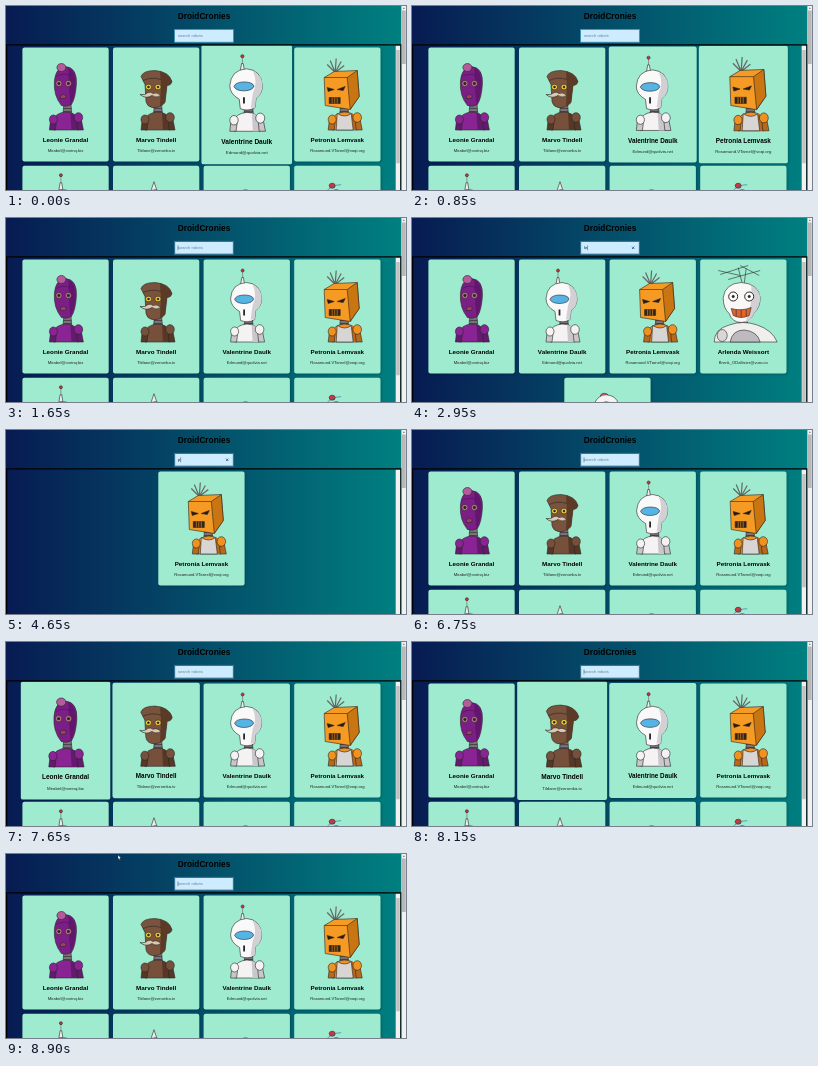
An HTML page that plays this animation: 400x184 px, repeating every 8.95 s.

```html
<!DOCTYPE html>
<html lang="en">
<head>
<meta charset="utf-8">
<title>Robot directory</title>
<style>
  html, body { margin: 0; width: 100%; height: 100%; overflow: hidden; }
  svg { display: block; width: 100vw; height: 100vh; font-family: "Liberation Sans", Arial, sans-serif; }
  .card { filter: drop-shadow(1px 1px 1px rgba(0, 0, 0, .2)); }
  .art { stroke: #2a2528; stroke-width: .6; stroke-linejoin: round; }
  .name { font-size: 6.25px; font-weight: bold; text-anchor: middle; }
  .mail { font-size: 4.17px; text-anchor: middle; fill: #222; }
</style>
</head>
<body>
<svg viewBox="0 0 400 184">
  <defs>
    <linearGradient id="sky"><stop stop-color="#071b52"/><stop offset="1" stop-color="#008080"/></linearGradient>
    <clipPath id="view"><rect x="1.3" y="39.6" width="388.4" height="145"/></clipPath>
  </defs>
  <rect width="395.6" height="184" fill="url(#sky)"/>
  <text x="198" y="13.4" font-size="8.3" font-weight="bold" text-anchor="middle">DroidCronies</text>

  <rect id="field" x="168.6" y="23.4" width="58.8" height="12.8" fill="#cdecff"/>
  <text id="query" x="172" y="31.2" font-size="4.1"></text>
  <path id="caret" stroke="#111" stroke-width=".4"/>
  <path id="clear" d="M220 28.6l2.4 2.4m0-2.4l-2.4 2.4" stroke="#123a6b" stroke-width=".7"/>

  <g id="cards" clip-path="url(#view)"></g>

  <rect x="389.7" y="39.6" width="4.6" height="145" fill="#f1f1f1"/>
  <rect id="thumb" x="390.2" y="44" width="3.5" fill="#c1c1c1"/>
  <path d="M.65 190V38.95H394.95V190" fill="none" stroke="#000" stroke-width="1.3"/>
  <rect x="395.6" width="4.4" height="184" fill="#f1f1f1"/>
  <rect x="396" y="4.5" width="3.7" height="53.5" fill="#b8b8b8"/>
  <path d="M396.8 2.8h2l-1-1.2z" fill="#555"/>
  <path id="pointer" d="M0 0v4.3l1-.9.7 1.5.7-.3-.7-1.5h1.3z" fill="#fff" stroke="#111" stroke-width=".3"/>
</svg>
<script>
const LOOP = 8950, PITCH_X = 90.6, PITCH_Y = 118.2, W = 86.3, H = 114;
const $ = id => document.getElementById(id);

// Drawing helpers, in card coordinates
const path = (d, fill = 'none', extra = '') => `<path d="${d}" fill="${fill}" ${extra}/>`;
const oval = (x, y, rx, ry, fill, extra = '') =>
  `<ellipse cx="${x}" cy="${y}" rx="${rx}" ry="${ry}" fill="${fill}" ${extra}/>`;
const neck = x => path(`M${x - 3.5} 56h7l1 11h-9z`, '#77757a') + path(`M${x - 4} 61h8m-8 3h8`);
const torso = (fill, shade, x) =>
  path(`M${x - 12} 82.5v-10q2-7 12-8q10 0 13 8v10z`, fill) + path(`M${x + 5} 65q6 2 8 7v10.5h-7z`, shade, 'stroke="none"') +
  path(`M${x - 15} 74l-1 8.5h6l1-8z`, shade) + oval(x - 12, 72, 4, 4.5, fill) +
  path(`M${x + 11} 72l1 10.5h6l-2-10z`, shade) + oval(x + 13, 70, 4.3, 4.8, fill);
const mast = (x, top, base, tip) => path(`M${x} ${top}V${base}`, 'none', 'stroke="#666"') +
  path(`M${x - 2} ${base}l1.2-7h1.6l1.2 7z`, '#eee') + oval(x, top, 1.5, 1.5, tip);
const dome = (fill, shade) => neck(44) + torso(fill, shade, 44) + oval(42, 42, 14, 18, fill);

const art = [
  neck(45) + torso('#8a2494', '#651a70', 43) +
    path('M32 34q1-14 11-15q12 1 11 18q-1 14-5 20q-5 3-10 1q-8-10-7-24z', '#7b1f87') +
    path('M46 20q8 4 7 19q-1 12-5 18q-2-20-2-37z', '#63166d', 'stroke="none"') +
    oval(39, 20, 4.5, 4, '#b65a9c') + path('M34 29q6-4 14-1', 'none', 'stroke="#4c1257"') +
    oval(36.5, 36, 3, 3, '#c77f8f') + oval(46, 36, 3, 3, '#c77f8f') +
    oval(36.5, 36, 1.3, 1.3, '#222') + oval(46, 36, 1.3, 1.3, '#222') + path('M38 48q3-2 6 0l-1 3h-5z', '#a83a6a'),
  neck(45) + torso('#76503a', '#573725', 44) +
    path('M28 29q2-6 14-6q14 1 17 11q-1 4-5 4l-2 17q-5 6-13 5q-5-1-6-6l-1-17z', '#7a533c') +
    path('M47 24q10 3 12 10q-1 4-5 4l-2 17l-5 4l1-21z', '#5c3a28', 'stroke="none"') + path('M30 33q9-4 18-1'),
  mast(39, 11, 25, '#d8333c') + neck(45) + torso('#f4f2f2', '#c9c7cb', 43) +
    path('M27 39q1-15 16-16q14 1 15 16q0 8-6 12l-1 9q-6 4-14 1l-1-9q-9-5-9-13z', '#faf9f9') +
    path('M49 25q9 4 9 14q0 8-6 12l-1 9h-4l2-14q5-10 0-21z', '#d2d0d4', 'stroke="none"') +
    path('M31 40q1-4 9-4.500q9 0 10 4q-1 4-9 4.500q-8 0-10-4z', '#55b4e4') + path('M40.500 50v6', 'none', 'stroke-width="1.800"'),
  path('M41 25l-8-8m8 8l-5-12m5 12l1-14m-1 14l6-11m-6 11l9-7', 'none', 'stroke="#666" stroke-width="1.200"') +
    neck(50) + torso('#f0921f', '#b9691a', 50) + path('M43 66q8 5 14 0l2 16.500H42z', '#d8d6d4') +
    path('M30 30l10-6l23-1l2 26l-9 13l-25-4z', '#f59a23') + path('M53 30l10-7l2 26l-9 13z', '#c87512') +
    path('M30 30l23 0M33 40l7 2l-6 2zM51 39l-8 3l6 1z', '#2a1a0c') +
    path('M35 50h11v6H35z', '#33241a') + path('M38 50v6m2.500-6v6m2.500-6v6', 'none', 'stroke="#f59a23"'),
  mast(38.500, 9.500, 24, '#d8333c') + dome('#eee', '#bbb'),
  path('M38 25l3-9l3 9z', '#eee') + dome('#8d9696', '#667'),
  dome('#eee', '#bbb'),
  oval(38, 20, 3, 2.500, '#d8333c') + dome('#3f9fd8', '#2a6c99') + path('M31 27q6-8 16-8', 'none', 'stroke="#2a6c99"'),
  path('M42 24L38 8m6 16L46 9M20 15l28-9M18 11l22 5M28 20l32-9M40 6l19 10') +
    neck(43) + path('M14 82.500q0-13 15-17q14-5 28 0q15 5 20 17z', '#f1efee') +
    path('M30 82.500q2-12 14-12q13 1 16 12z', '#bdbbbf') + oval(22, 76, 5, 6, '#d8d6d8') +
    path('M23 38q2-14 18-15q17 1 19 15q0 10-6 15q-4 10-13 10q-9 0-12-9q-6-5-6-16z', '#faf8f7') +
    path('M51 26q9 5 9 13q-1 9-6 14q-3 8-9 10q8-18 6-37z', '#d2d0d4', 'stroke="none"') +
    oval(33, 37, 4.500, 4.500, '#fff', 'stroke-width="1"') + oval(49, 37, 4.500, 4.500, '#fff', 'stroke-width="1"') +
    oval(33, 37, 1.200, 1.200, '#222') + oval(49, 37, 1.200, 1.200, '#222') +
    path('M31 49q10 3 20-1l-2 8q-8 4-16 0z', '#e0662f') + path('M36 50v7m5-7v8m5-8v7'),
  oval(40, 19, 4, 3.500, '#d9737b') + path('M30 26q4-9 12-9q10 1 12 9z', '#f4f2f2') + dome('#f4f2f2', '#c9c7cb'),
];
// Yellow eyes and moustache
art[1] += [35.500, 45].map(x => oval(x, 39.500, 3, 2.800, '#f6d535') + oval(x, 39.500, 1, 1, '#222')).join('') +
  path('M27 47q5 1 8-2q3-1 5 1q4-2 8 2q-5 3-9 0q-6 4-12-1z', '#d9c9b2');

const people = [
  ['Leonie Grandal', 'Mirabel@ovrinq.biz'], ['Marvo Tindell', 'Tildane@zeromka.tv'],
  ['Valentrine Daulk', 'Edmund@quolvia.net'], ['Petronia Lemvask', 'Rosamund.VTarnel@voqi.org'],
  ['Ottoline Brisk', 'Hodwin@tavrik.ca'], ['Mr. Harlin Selkov', 'Fenwick_Oss@jorvel.info'],
  ['Kurtan Weindor', 'Odrin.Vask@belixo.biz'], ['Wilhard Ostrander', 'Senna@rumovik.me'],
  ['Arlenda Weissort', 'Brenk_ODallister@vunu.io'], ['Celestria Dumond', 'Ivo.Tarn@kolvex.biz'],
];

$('cards').innerHTML = people.map(([name, mail], i) => `<g class="card">
  <rect width="${W}" height="${H}" rx="2.1" fill="#9eebcf"/><g class="art">${art[i]}</g>
  <text class="name" x="43.15" y="94.4">${name}</text><text class="mail" x="43.15" y="104.4">${mail}</text></g>`).join('');
const cards = [...$('cards').children];

const typing = [[0, ''], [2400, 'l'], [2800, 'le'], [3900, 'l'], [4100, ''], [4600, 'p'], [6300, '']];

// Hovered card, from, to
const hovers = [[2, -300, 400], [3, 400, 800], [2, 800, 1150], [2, 6950, 7130], [3, 7130, 7320],
  [2, 7320, 7430], [1, 7430, 7530], [0, 7530, 7900], [1, 7900, 8130], [2, 8130, 8500], [1, 8500, 8660]];

const clamp = u => Math.min(1, Math.max(0, u));
const ease = u => 1 - (1 - clamp(u)) ** 2;

function layout(query, t) {
  const shown = people.map((_, i) => i).filter(i => people[i][0].toLowerCase().includes(query));
  cards.forEach((card, i) => {
    const slot = shown.indexOf(i);
    card.style.display = slot < 0 ? 'none' : '';
    if (slot < 0) return;
    const row = Math.floor(slot / 4), inRow = Math.min(4, shown.length - row * 4);
    const cx = 195.45 + (slot % 4 - (inRow - 1) / 2) * PITCH_X, cy = 98.5 + row * PITCH_Y;
    const grow = hovers.filter(h => h[0] === i)
      .reduce((sum, [, from, to]) => sum + ease((t - from) / 250) - ease((t - to) / 250), 0);
    card.setAttribute('transform', `translate(${cx} ${cy}) scale(${1 + .05 * clamp(grow)}) translate(${-W / 2} ${-H / 2})`);
  });
  const content = Math.ceil(shown.length / 4) * PITCH_Y;
  $('thumb').setAttribute('height', content > 208 ? 193 * 208 / content : 0);
}

function draw(now) {
  const t = now % LOOP, query = typing.findLast(k => k[0] <= t)[1], focused = t >= 1400;
  layout(query, t);
  $('query').textContent = query || 'search robots';
  $('query').setAttribute('fill', query ? '#111' : '#6d7f8c');
  $('field').setAttribute('stroke', focused ? '#36718f' : '#3f93b5');
  $('field').setAttribute('stroke-width', focused ? 1.1 : .8);
  $('clear').style.display = query ? '' : 'none';
  $('caret').setAttribute('d', `M${172 + (query ? $('query').getComputedTextLength() + .3 : 0)} 27.4v4.8`);
  $('caret').style.display = focused && (t - 1400) % 1060 < 530 ? '' : 'none';
  // The pointer leaves through the top edge
  const leave = clamp((t - 8500) / 350);
  $('pointer').setAttribute('transform', `translate(${200 - 88 * leave} ${90 - 89 * leave})`);
  $('pointer').style.display = leave ? '' : 'none';
  requestAnimationFrame(draw);
}
requestAnimationFrame(draw);
</script>
</body>
</html>
```
